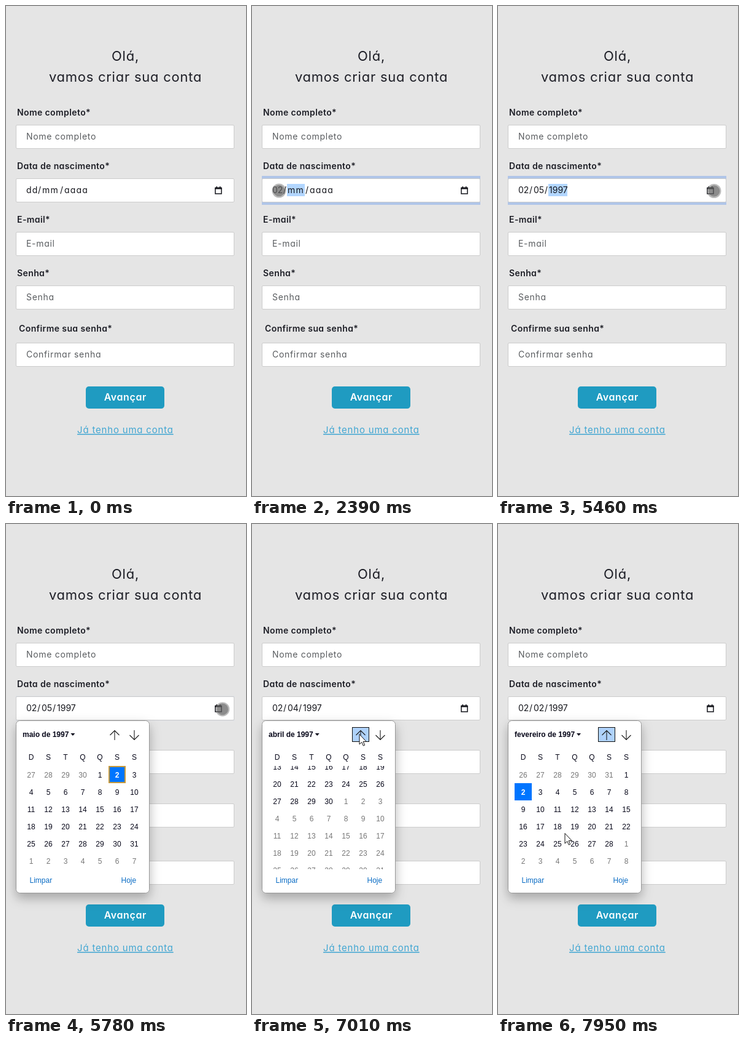
Write an HTML page that moves like this. It is 391 px wide and 796 px high and loops after 8 s.

```html
<!DOCTYPE html>
<html lang="pt">
<head>
<meta charset="utf-8">
<title>Criar conta</title>
<style>
html, body { margin: 0; width: 100%; height: 100%; overflow: hidden; background: #e5e5e5; }
svg { display: block; width: 100vw; height: 100vh; }
text { white-space: pre; }
.form { font: 14px Inter, "Open Sans", sans-serif; font-feature-settings: "cv11"; fill: #1d1e26; }
.title { font-size: 22px; letter-spacing: .75px; text-anchor: middle; }
.label { font-weight: 600; letter-spacing: .4px; }
.hint { fill: #595c5f; letter-spacing: .7px; }
.date { fill: #15161c; }
.button { font-size: 16px; font-weight: 600; letter-spacing: .6px; fill: #fff; text-anchor: middle; }
.link { font-size: 15px; letter-spacing: .8px; fill: #41a6d2; text-anchor: middle; text-decoration: underline; }
.box { fill: #fff; stroke: #ccc; }
.picker { font: 12px "Liberation Sans", Arial, sans-serif; fill: #08081a; }
.day { text-anchor: middle; }
.other { fill: #777; }
.chosen { fill: #fff; font-weight: bold; }
.action { fill: #0a6cc4; }
.line { fill: none; stroke: #1b1b1b; stroke-width: 1.1; }
</style>
</head>
<body>
<svg id="stage" viewBox="0 0 391 796" xmlns="http://www.w3.org/2000/svg">
  <defs>
    <clipPath id="weeks"><rect x="18" y="393" width="214" height="168"/></clipPath>
    <filter id="shadow" x="-30%" y="-30%" width="160%" height="160%">
      <feDropShadow dx="0" dy="8" stdDeviation="9" flood-opacity=".28"/>
    </filter>
  </defs>
  <rect width="391" height="796" fill="#e5e5e5"/>
  <g id="form" class="form">
    <text class="title" x="194.5" y="89">Olá,</text>
    <text class="title" x="194.5" y="123">vamos criar sua conta</text>
    <rect id="glow" x="16" width="356" fill="#b0c5e8"/>
  </g>
  <g class="form">
    <rect x="130" y="618" width="128" height="36" rx="5" fill="#1f9bc1"/>
    <text class="button" x="194.3" y="641">Avançar</text>
    <text class="link" x="194.4" y="694">Já tenho uma conta</text>
  </g>
  <g id="date" class="form date">
    <rect id="selection" y="289" height="20" fill="#b2d6ff"/>
  </g>
  <path d="M341 296h10v9h-10zM343.3 293v3M348.7 293v3" fill="none" stroke="#15161c" stroke-width="1.5"/>
  <path d="M340.5 294.5h11v3h-11z" fill="#15161c"/>
  <g id="touch">
    <circle r="11.5" fill="#777" fill-opacity=".5"/>
    <circle id="core" r="9.3" fill="#555"/>
  </g>
  <g id="picker" class="picker">
    <rect x="16.5" y="319.5" width="217" height="280" rx="6" fill="#fff" stroke="#999" filter="url(#shadow)"/>
    <text id="month" x="27" y="346" font-weight="bold"></text>
    <path id="caret" d="M0 340h7l-3.5 4z"/>
    <rect id="upFocus" x="163.5" y="330.5" width="27" height="23" fill="#afd2fc" stroke="#111"/>
    <path class="line" d="M177 351V335.500M169.500 343L177 335.500L184.500 343"/>
    <path class="line" d="M209 335V350.500M201.500 343L209 350.500L216.500 343"/>
    <g id="grid" clip-path="url(#weeks)"><rect id="chosen" width="28" height="28" fill="#0075ff"/></g>
    <text class="action" x="38.500" y="583">Limpar</text>
    <text class="action" x="187.500" y="583">Hoje</text>
  </g>
  <path id="arrow" d="M0 0V16.500L3.800 12.900L6.300 18.700L8.700 17.700L6.200 12H11.300Z" fill="#fff" stroke="#111"/>
</svg>
<script>
const LOOP = 8000, STEP = 1000 / 15, DAY = 864e5;
const OPEN = 5580, ENTER = 6050, HOVER = 6700;
const FIRST_SUNDAY = Date.UTC(1997, 3, 27);
const MONTHS = ['janeiro', 'fevereiro', 'março', 'abril', 'maio'];
const $ = id => document.getElementById(id);

function add(parent, tag, attrs, text = '') {
  const el = document.createElementNS('http://www.w3.org/2000/svg', tag);
  set(el, attrs);
  el.textContent = text;
  return parent.appendChild(el);
}
function set(el, attrs) {
  for (const key in attrs) el.setAttribute(key, attrs[key]);
}
function show(el, on) {
  el.style.display = on ? '' : 'none';
}
const clamp = v => Math.max(0, Math.min(1, v));
const ease = v => (1 - Math.cos(Math.PI * clamp(v))) / 2;

// label, hint, top of box, label x
const fields = [
  ['Nome completo*', 'Nome completo', 193, 18],
  ['Data de nascimento*', '', 280, 18],
  ['E-mail*', 'E-mail', 367, 18],
  ['Senha*', 'Senha', 454, 18],
  ['Confirme sua senha*', 'Confirmar senha', 547, 21]
];
fields.forEach(([label, hint, y, x], i) => {
  add($('form'), 'text', { class: 'label', x, y: y - (i === 4 ? 18 : 15) }, label);
  add($('form'), 'rect', { class: 'box', x: 16.5, y: y + .5, width: 355, height: 38, rx: 1.5 });
  add($('form'), 'text', { class: 'hint', x: 33, y: y + 24 }, hint);
});

// time, day, month, year, selected part
const typing = [
  [0, 'dd', 'mm', 'aaaa', -1],
  [1320, 'dd', 'mm', 'aaaa', 0],
  [2190, '00', 'mm', 'aaaa', 0],
  [2390, '02', 'mm', 'aaaa', 1],
  [2720, '02', '00', 'aaaa', 1],
  [2920, '02', '05', 'aaaa', 2],
  [3400, '02', '05', '0001', 2],
  [3660, '02', '05', '0019', 2],
  [3860, '02', '05', '0199', 2],
  [4060, '02', '05', '1997', 2],
  [OPEN, '02', '05', '1997', -1],
  [6855, '02', '04', '1997', -1],
  [7180, '02', '03', '1997', -1],
  [7480, '02', '02', '1997', -1]
];
// time, month index, first visible week
const scrolls = [[0, 4, 0], [6855, 3, -4], [7180, 2, -9], [7480, 1, -13]];
// time, x, y
const path = [
  [500, 271, 617], [640, 150, 470], [780, 55, 320], [900, 12, 251], [1180, 44, 300],
  [4590, 44, 300], [4900, 130, 297], [5150, 250, 312], [5380, 343, 302], [5445, 352, 300.5],
  [5800, 353, 301], [ENTER, 233, 345], [6260, 200, 385], [6500, 192, 362], [HOVER, 175, 341.5],
  [7660, 175, 341.5], [7910, 109, 502.5]
];

const parts = [0, 1, 2, 3, 4].map(() => add($('date'), 'text', { y: 304 }));
[...'DSTQQSS'].forEach((name, i) =>
  add($('picker'), 'text', { class: 'day', x: 41 + 28 * i, y: 383 }, name));
const cells = Array.from({ length: 49 }, () => add($('grid'), 'text', {}));

const latest = (table, t) => table.findLast(row => row[0] <= t);

function pointAt(t) {
  const next = path.findIndex(p => p[0] > t);
  if (next === 0) return path[0].slice(1);
  if (next < 0) return path.at(-1).slice(1);
  const a = path[next - 1], b = path[next], k = (t - a[0]) / (b[0] - a[0]);
  return [1, 2].map(i => a[i] + (b[i] - a[i]) * k);
}

function drawDate(t) {
  const [, day, month, year, selected] = latest(typing, t);
  const monthX = day === 'dd' ? 59 : 58;
  const slashX = monthX + (month === 'mm' ? 29 : 18);
  const yearX = slashX + 7;
  const xs = [33, monthX - 7, monthX, slashX, yearX];
  [day, '/', month, '/', year].forEach((text, i) => {
    parts[i].textContent = text;
    set(parts[i], { x: xs[i], 'letter-spacing': /[a-z]/.test(text) ? 1.2 : 0 });
  });
  show($('selection'), selected >= 0);
  if (selected >= 0) {
    const width = [day === 'dd' ? 20 : 18, month === 'mm' ? 29 : 19, year === 'aaaa' ? 38 : 31][selected];
    set($('selection'), { x: [33, monthX - 1, yearX - 1][selected], width });
  }
}

function drawPicker(t, held) {
  show($('picker'), t >= OPEN);
  if (t < OPEN) return;
  const index = scrolls.indexOf(latest(scrolls, t));
  const [start, month, target] = scrolls[index];
  const from = index ? scrolls[index - 1][2] : target;
  const top = from + (target - from) * ease((held - start) / 300);
  const firstWeek = Math.floor(top);

  $('month').textContent = `${MONTHS[month]} de 1997`;
  set($('caret'), { transform: `translate(${27 + $('month').getComputedTextLength() + 3} 0)` });
  show($('upFocus'), t >= HOVER);
  show($('chosen'), false);
  cells.forEach((cell, i) => {
    const col = i % 7, week = firstWeek + Math.floor(i / 7);
    const date = new Date(FIRST_SUNDAY + (week * 7 + col) * DAY);
    const current = date.getUTCMonth() === month;
    const chosen = current && date.getUTCDate() === 2;
    const x = 41 + 28 * col, y = 407.5 + 28 * (week - top);
    cell.textContent = date.getUTCDate();
    set(cell, { x, y: y + 4.5, class: `day ${chosen ? 'chosen' : current ? '' : 'other'}` });
    if (!chosen) return;
    const ring = t < scrolls[1][0];
    const inset = ring ? 1 : 0;
    show($('chosen'), true);
    set($('chosen'), {
      x: x - 14 + inset, y: y - 14.5 + inset, width: 28 - 2 * inset, height: 28 - 2 * inset,
      stroke: ring ? '#c79a3c' : 'none', 'stroke-width': 2
    });
  });
}

function drawPointer(t, held) {
  const [x, y] = pointAt(held);
  const transform = `translate(${x} ${y})`;
  show($('touch'), t >= 500 && held < ENTER);
  show($('arrow'), held >= ENTER);
  set($('touch'), { transform });
  set($('arrow'), { transform });
  set($('core'), { 'fill-opacity': t >= 1320 && t < 1700 ? .6 : .45 });
}

function draw(t) {
  const held = Math.floor((t + 18) / STEP) * STEP - 18;
  const focus = clamp((held - 1270) / 150) * (1 - clamp((held - OPEN) / 150));
  set($('glow'), { y: 280 - 4 * focus, height: 39 + 8 * focus, opacity: focus ? .25 + .75 * focus : 0 });
  drawDate(t);
  drawPicker(t, held);
  drawPointer(t, held);
}

const begin = performance.now();
function tick() {
  draw((performance.now() - begin) % LOOP);
  requestAnimationFrame(tick);
}
tick();
</script>
</body>
</html>
```
